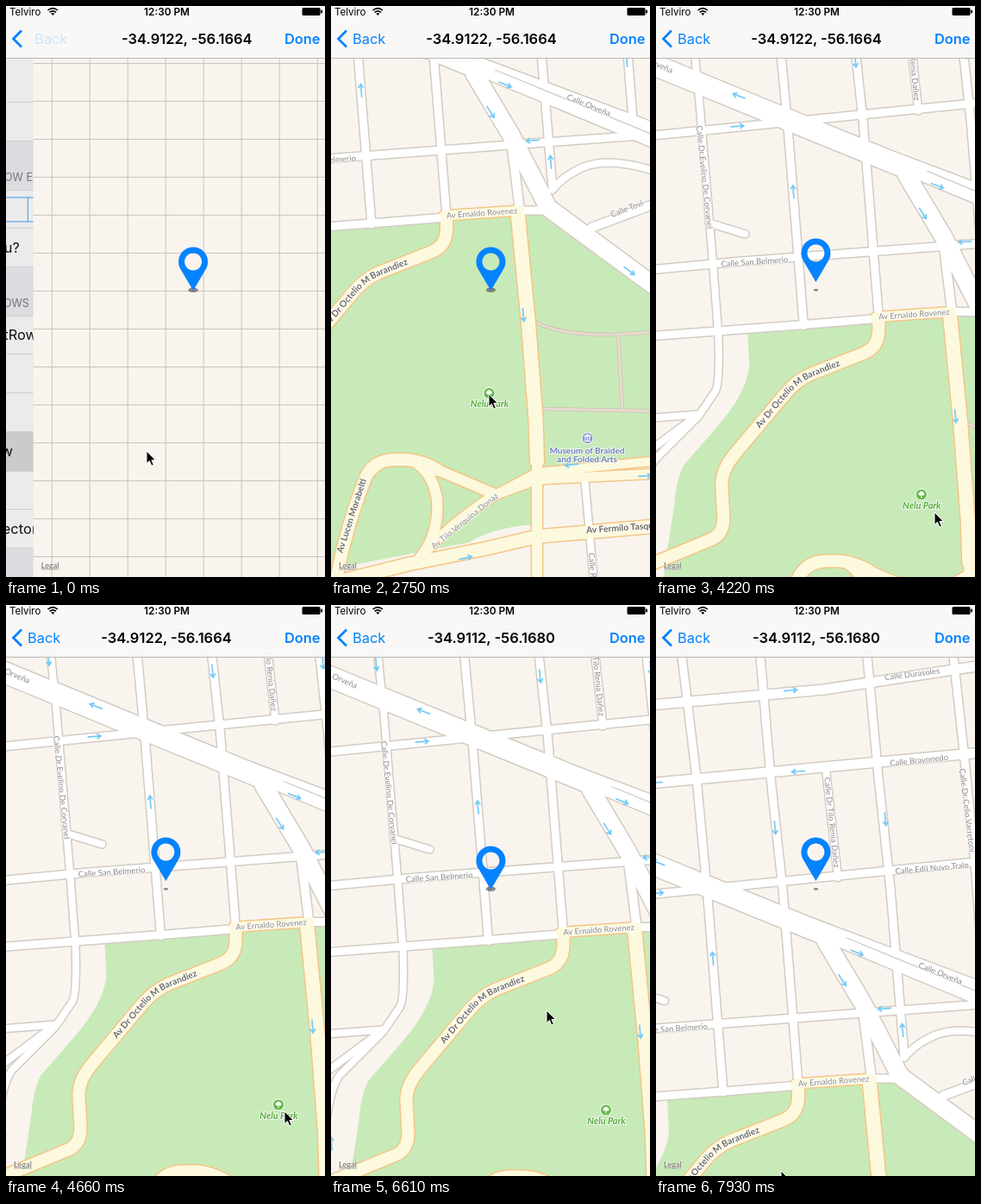
These frames come from a looping animation (370 px wide and 662 px high, 8000 ms). An HTML page:

```html
<!DOCTYPE html>
<html lang="en">
<head>
<meta charset="utf-8">
<title>Location picker</title>
<style>
  html, body { margin: 0; width: 100%; height: 100%; overflow: hidden; }
  svg { display: block; width: 100%; height: 100%; }
  text { font-family: Inter, sans-serif; }
  .road { fill: none; stroke-linejoin: round; stroke-linecap: round; }
  .label text { font: 9.5px Lato, sans-serif; fill: #8b8987; stroke: #fff; stroke-width: 2px;
    stroke-opacity: .8; stroke-linejoin: round; paint-order: stroke; text-anchor: middle; }
  .label .strong { font-weight: 700; font-size: 10.4px; fill: #6c6a67; }
  .label .start { text-anchor: start; }
  .label .park { font-weight: 700; font-style: italic; font-size: 10.8px; fill: #58ab3d; }
  .label .museum { font-weight: 700; font-size: 10px; fill: #6f7cba; }
  .arrow { fill: none; stroke: #74caf8; stroke-width: 1.7; }
  .nav { font-size: 16.4px; fill: #0583ff; }
  .form text { font-size: 16.4px; fill: #111; }
  .form .header { font-size: 12.5px; fill: #737378; }
</style>
</head>
<body>
<svg viewBox="0 0 370 662" preserveAspectRatio="none">
  <defs>
    <pattern id="grid" x="21" y="22" width="44" height="44" patternUnits="userSpaceOnUse">
      <path d="M.5 0V44M0 .5H44" stroke="#c8c5bf"/>
    </pattern>
    <clipPath id="loaded"><path id="tiles"/></clipPath>
    <path id="curve" d="M-24 391L25 333Q38 317 56 309L117 285"/>
  </defs>

  <g id="form" class="form"></g>

  <g id="screen">
    <rect width="370" height="662" fill="#f9f4ed"/>
    <rect width="370" height="662" fill="url(#grid)"/>
    <g clip-path="url(#loaded)"><g id="map"></g></g>
    <ellipse id="shadow" rx="5.6" ry="2.8" fill="#454545" opacity=".62"/>
    <path id="pin" fill="#0583ff" fill-rule="evenodd"
      d="M185.4 330L170.8 305.2A17 17 0 1 1 200 305.2ZM185.4 286.5a10 10 0 1 0 .01 0Z"/>
    <text x="9" y="651.5" text-decoration="underline"
      style="font:700 9px Lato,sans-serif;fill:#8a8782;stroke:#fff;stroke-opacity:.6;paint-order:stroke">Legal</text>
  </g>

  <rect width="370" height="60" fill="#f9f8f7" fill-opacity=".96"/>
  <path d="M0 60.5H370" stroke="#bcbab7"/>
  <text x="4" y="10.5" font-size="11.5">Telviro</text>
  <g fill="none" stroke="#000" stroke-width="1.6">
    <path d="M48.5 5Q54.3 .2 60 5M50.6 7.4Q54.3 4.2 58 7.4"/>
    <path d="M52.3 8.8Q54.3 7.3 56.3 8.8L54.3 11Z" fill="#000" stroke="none"/>
  </g>
  <text x="186.5" y="10.7" font-size="11.8" font-weight="600" text-anchor="middle">12:30 PM</text>
  <rect x="343.5" y="2" width="21" height="9" rx="1.5"/><rect x="365" y="4.5" width="2" height="4" rx="1"/>
  <path d="M18 28.5L8.5 38L18 47.5" fill="none" stroke="#0583ff" stroke-width="2.8"/>
  <text id="back" class="nav" x="25" y="44">Back</text>
  <text id="title" x="186" y="44" font-size="16.5" font-weight="600" text-anchor="middle"></text>
  <text class="nav" x="364.5" y="44" font-weight="600" text-anchor="end">Done</text>

  <path id="cursor" d="M0 0V14.5L3.4 11.4L5.8 17L8.3 15.9L5.9 10.5H10.5Z" stroke="#fff" stroke-width="1"/>
</svg>
<script>
const $ = id => document.getElementById(id);

// ---------- Form screen leaving on the left ----------
const row = (y, h, fill = '#ebebeb') =>
  `<rect x="-20" y="${y}" width="110" height="${h}" fill="${fill}"/>
   <path d="M-20 ${y + .5}h110M-20 ${y + h + .5}h110" stroke="#cfcfd2"/>`;
const tail = (x, y, text, cls = '') => `<text class="${cls}" x="${x}" y="${y}" text-anchor="end">${text}</text>`;
$('form').innerHTML = `<rect x="-20" width="110" height="662" fill="#dcdce1"/>` +
  row(60, 51) + row(111, 45) + row(213, 44) + row(257, 45) +
  [359, 403, 448, 539, 583].map(y => row(y, 45)).join('') + row(493, 46, '#cbcbcb') +
  `<path d="M-20 222H60V250H-20M25.5 222V250" fill="none" stroke="#3f97e8"/>` +
  tail(31, 203, 'ROW E', 'header') + tail(27, 349, 'ROWS', 'header') +
  tail(16, 286, 'u?') + tail(36, 387, 'tRow') + tail(8, 522, 'w') + tail(36, 612, 'ector');

// ---------- Map, in coordinates of its resting position ----------
const footpaths = [[3, 'M238 367Q268 382 330 381L400 376M333 381L338 467M243 467L400 470']];
const streets = [
  [9, 'M-1-252L16-112L29 28L47 253'],
  [9, 'M90-252L102-112L116 18L134 244'],
  [8, 'M166-122L180 4'],
  [9, 'M214-252L227-112L241 18L257 212'],
  [9, 'M314-252L326-142L339-12L350 132'],
  [8, 'M-99-260L-74-7L-58 184L-52 264Q-50 322-56 330L-75 358L-125 408Q-143 430-147 540'],
  [8, 'M-180 364L-75 356L-145 408'],
  [8, 'M-60 135L-21 147'],
  [9, 'M-180 269L47 252L134 245M217 237H252'],
  [9, 'M-180 193L-31 179L209 161L400 147'],
  [9, 'M-180 38L119 8L400-20'],
  [11, 'M-180-92L99-118L400-146'],
  [11, 'M-180-183L164-214L400-250'],
  [10, 'M302 257L400 220'],
  [8, 'M257 213Q268 198 292 187Q330 172 400 200'],
  [10, 'M209 158L219 237'],
  [8, 'M294 545L306 680'],
  [24, 'M-180-71L35 17L165 70'],
  [13, 'M150 58L400 152'],
  [14, 'M150 64L400 168'],
  [20, 'M166 78L209 150L252 234L400 343'],
];
const avenues = [
  [11, 'M131 243L219 237'],
  [16, 'M217 244L229 368L237.5 480L239 528'],
  [12, 'M239 528V690'],
  [14, 'M134 245V258Q134 278 117 285L56 309Q38 317 25 333L-33 402Q-49 421-48 440L-46 476Q-46 493-58 500L-160 542'],
  [14, 'M2 690Q12 620 38 552Q47 526 74 526H88Q108 528 124 538'],
  [12, 'M95 527Q108 529 124 538L190 566'],
  [12, 'M95 527Q118 540 123 572Q126 612 103 640'],
  [11, 'M103 640Q140 598 190 567L239 549L400 541'],
  [10, 'M190 567L239 541L400 525'],
  [15, 'M-10 672L90 647L180 629L239 615L400 601'],
];
const roads = (list, color, extra = 0) => list.map(([width, d]) =>
  `<path class="road" d="${d}" stroke="${color}" stroke-width="${width + extra}"/>`).join('');

const arrow = ([x, y, angle]) =>
  `<path class="arrow" transform="translate(${x} ${y}) rotate(${angle})" d="M-8 0H7M3-3L7.5 0L3 3"/>`;
const label = (x, y, angle, text, cls = '') =>
  `<text class="${cls}" transform="translate(${x} ${y}) rotate(${angle})" y="3.3">${text}</text>`;

const earlyArrows = [[202, 91, 22], [185, 123, 57], [234, 156, 176], [255, 181, -95], [346, 307, 37],
  [223, 358, 85], [343, 63, -95], [235, -64, 85], [107, -54, 85], [125, -213, -4], [134, -119, 176]];
const lateArrows = [[35, 98, -95], [156, 640, -12], [-28, -13, 201], [-30, 22, -5], [-83, -68, 85],
  [-31, -106, 176], [-135, 488, -95]];

$('map').innerHTML = `
  <rect x="-200" y="-300" width="640" height="1040" fill="#f9f4ee"/>
  <path fill="#c8eab8" d="M-18 262L135 250L252 238L400 345V525L240 541L237 601Q190 604 160 622L-10 655L-130 670
    L-113 526L-103 460Q-100 422-88 410L-53 370Q-20 332-16 300Z"/>
  ${roads(footpaths, '#cdbfb1', 1.5)}
  ${roads(footpaths, '#e6dccf')}
  ${roads(streets, '#d3ccc3', 3)}
  ${roads(avenues, '#f4c587', 3)}
  ${roads(streets, '#fff')}
  ${roads(avenues, '#fcf9de')}
  <path d="M190 74L400 160" stroke="#d3ccc3" stroke-width="1.3"/>
  <g id="early" class="label">
    ${earlyArrows.map(arrow).join('')}
    ${label(299, 115, 22, 'Calle Orveña')}
    ${label(343, 235, -21, 'Calle Tovi')}
    ${label(175, 240, -4, 'Av Ernaldo Rovenez')}
    ${label(173, -60, 84, 'Calle Dr Tilo Renia Dañez')}
    ${label(266, -232, -7, 'Calle Durasoles')}
    ${label(274, -132, -6, 'Calle Bravonedo')}
    ${label(289, -7, -5, 'Calle Edil Nuvo Tralo')}
    ${label(330, -74, 83, 'Calle Dr Celio Varretoni')}
  </g>
  <g id="late" class="label">
    ${lateArrows.map(arrow).join('')}
    ${label(-130, -53, 23, 'Calle Orveña')}
    ${label(-10, 179, -4, 'Calle San Belmerio')}
    ${label(-68, 81, 84, 'Calle Dr Evelino De Corvanel')}
    ${label(302, 634, 85, 'Calle Rulo', 'start')}
    <text class="strong" dy="3.3"><textPath href="#curve" startOffset="49%">Av Dr Octelio M Barandiez</textPath></text>
  </g>
  <g id="places" class="label">
    ${[[279, 532, 174], [364, 545, -3]].map(arrow).join('')}
    ${label(24, 591, -72, 'Av Lucen Morabelti', 'strong')}
    ${label(155, 597, -39, 'Av Tilo Verquina Donaz')}
    ${label(296, 608, -4, 'Av Fermilo Tasquer', 'strong start')}
    <circle cx="183.5" cy="449" r="6.5" fill="#62ba46" stroke="#fff"/>
    <path d="M183 453V450H181A2 2 0 0 1 181 446.5A3 3 0 0 1 186 446.5A2 2 0 0 1 186 450H184V453Z" fill="#fff"/>
    ${label(184, 462, 0, 'Nelu Park', 'park')}
    <circle cx="297.5" cy="501" r="6.5" fill="#8995d0" stroke="#fff"/>
    <path d="M293.5 499L297.5 496.5L301.5 499ZM294 504.5H301M295 500V504M297.5 500V504M300 500V504" fill="#fff" stroke="#fff"/>
    ${label(297, 516, 0, 'Museum of Braided', 'museum')}
    ${label(297, 526, 0, 'and Folded Arts', 'museum')}
  </g>`;

// ---------- Motion ----------
const mapKeys = [[2790, 0, 0], [3540, 45, 32], [4150, 122, 114], [4660, 132.5, 130.5], [5000, 135.5, 136.5],
  [6640, 135.5, 136.5], [7930, 31, 312]];
const cursorKeys = [[150, 163, 516], [850, 180, 449], [1740, 180, 449], [2030, 183, 450], [2750, 183, 450],
  [3540, 246, 502.5], [4150, 323, 587], [5250, 323, 587], [5590, 250, 470], [6610, 250, 470], [7930, 145, 656]];

const ramp = (t, from, to) => Math.min(1, Math.max(0, (t - from) / (to - from)));
const ease = p => p * p * (3 - 2 * p);

// Monotone cubic interpolation of one column of the keys, at rest at both ends.
function follow(keys, t, column) {
  const slope = i => i < 0 || i > keys.length - 2 ? 0
    : (keys[i + 1][column] - keys[i][column]) / (keys[i + 1][0] - keys[i][0]);
  const tangent = i => {
    const a = slope(i - 1), b = slope(i);
    return a * b > 0 ? 2 * a * b / (a + b) : 0;
  };
  let i = 0;
  while (i < keys.length - 2 && t > keys[i + 1][0]) i++;
  const [start, end] = [keys[i], keys[i + 1]];
  const span = end[0] - start[0], p = ramp(t, start[0], end[0]), q = 1 - p;
  return start[column] + (end[column] - start[column]) * ease(p)
    + span * p * q * (q * tangent(i) - p * tangent(i + 1));
}

function loadedTiles(t) {
  if (t < 910) return 'M0 0Z';
  if (t < 1030) return 'M82 0H338V662H82Z';
  if (t < 1330) return 'M82 0H370V662H82Z';
  if (t < 1410) return 'M0 0H370V662H82V404H0Z';
  return 'M0 0H370V662H0Z';
}

const move = (id, x, y) => $(id).setAttribute('transform', `translate(${x} ${y})`);
const fade = (id, opacity) => $(id).setAttribute('opacity', opacity);

function draw(t) {
  const push = 32 * Math.exp(-t / 110);
  move('screen', push, 0);
  move('form', (push - 32) / 3, 0);
  move('title', push * .75, 0);
  move('back', push / 4, 0);
  fade('back', 1 - push / 38);
  $('title').textContent = t < 5000 ? '-34.9122, -56.1664' : '-34.9112, -56.1680';

  $('tiles').setAttribute('d', loadedTiles(t));
  fade('early', t < 1030 ? 0 : 1);
  fade('late', t < 1410 ? 0 : t < 1500 ? .5 : 1);
  fade('places', ramp(t, 1700, 2030));
  move('map', follow(mapKeys, t, 1), follow(mapKeys, t, 2));

  const lift = ease(ramp(t, 2790, 3000)) - ease(ramp(t, 5000, 5230)) + ease(ramp(t, 6640, 6850));
  move('pin', 0, -10 * lift);
  $('shadow').setAttribute('transform', `translate(185.4 329.3) scale(${1 - lift / 2})`);
  move('cursor', follow(cursorKeys, t, 1), follow(cursorKeys, t, 2));
}

const begin = performance.now();
function tick() {
  draw((performance.now() - begin) % 8000);
  requestAnimationFrame(tick);
}
tick();
</script>
</body>
</html>
```
